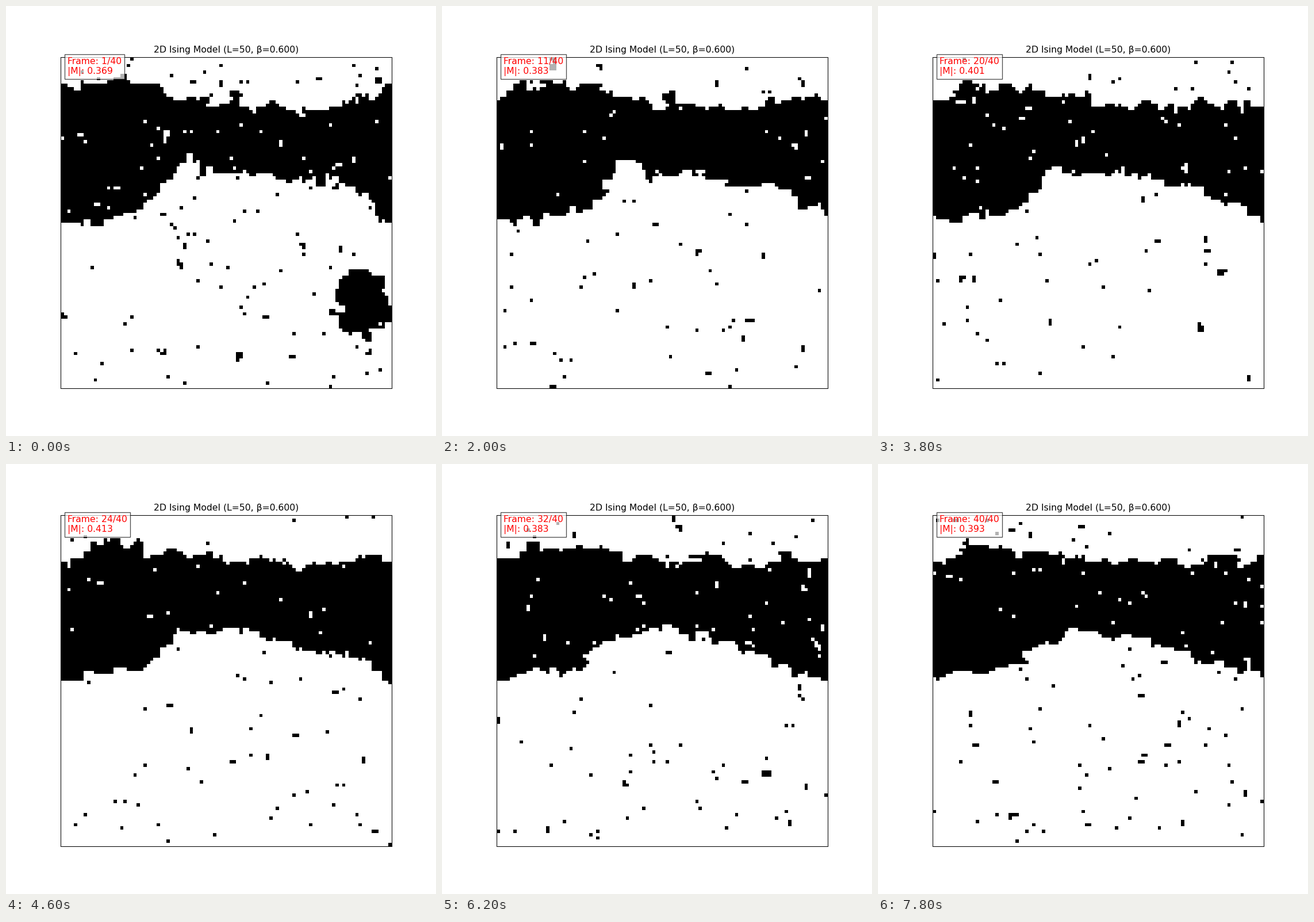
These frames come from a looping animation (748 px wide and 748 px high, 8000 ms). A matplotlib script:

```python
import numpy as np
import matplotlib.pyplot as plt
from matplotlib.animation import FuncAnimation

N = 100
FRAMES = 40
BETA = 0.6
SWEEPS = 3

# Band edges in rows at evenly spaced columns, at the start and end of the loop
TOP = ([11, 6.5, 7, 11.5, 14.5, 14, 17, 13, 10.5],
       [15, 8.5, 11, 12.5, 14, 12.5, 15.5, 12, 16])
BOTTOM = ([49, 51, 46, 31, 34, 35, 37, 38, 49],
          [50, 47, 45.5, 36.5, 35, 37, 41, 46, 49])

# Turning points of |M|: step -> value
MAG = {0: 0.369, 5: 0.376, 15: 0.390, 23: 0.413,
       27: 0.390, 34: 0.378, 39: 0.393}

rows, cols = np.indices((N, N))
x = np.arange(N)
parity = (rows + cols) % 2


def ripple(step, seed):
    """A few seeded waves drifting along an edge."""
    rng = np.random.default_rng(seed)
    waves = rng.integers(4, 10, 4)
    speed = rng.uniform(-0.25, 0.25, 4)
    phase = rng.uniform(0, 2 * np.pi, 4)
    angle = 2 * np.pi * np.outer(x / N, waves) + speed * step + phase
    return 0.5 * np.sin(angle).sum(axis=1)


def edge(ends, step, seed):
    first, last = map(np.array, ends)
    knots = first + (last - first) * step / (FRAMES - 1)
    curve = np.interp(x, np.linspace(0, N - 1, len(knots)), knots)
    return np.round(curve + ripple(step, seed))


def domains(step):
    """Dark band plus the droplet that dissolves early on."""
    dark = (rows >= edge(TOP, step, 1)) & (rows < edge(BOTTOM, step, 2))
    size = np.sqrt(max(0, 1 - step / 8.5))
    if size > 0:
        dx = (cols - 91 - 0.3 * step) / (9.3 * size)
        dy = (rows - 74 + 0.6 * step) / (10.5 * size)
        dark |= dx**2 + dy**2 < 1
    return np.where(dark, 1, -1)


def thermalize(spins, rng):
    """Checkerboard heat-bath sweeps on the periodic lattice."""
    for half in range(2 * SWEEPS):
        field = sum(np.roll(spins, d, axis) for d in (1, -1) for axis in (0, 1))
        p_up = 1 / (1 + np.exp(-2 * BETA * field))
        fresh = np.where(rng.random((N, N)) < p_up, 1, -1)
        spins = np.where(parity == half % 2, fresh, spins)
    return spins


def lattice(step):
    return thermalize(domains(step), np.random.default_rng(100 + step))


def label(step):
    mag = np.interp(step, list(MAG), list(MAG.values()))
    return f"Frame: {step + 1}/{FRAMES}\n|M|: {mag:.3f}"


fig, ax = plt.subplots(figsize=(8, 8), dpi=93.5)
fig.subplots_adjust(bottom=0.1107, top=0.8807)
image = ax.imshow(lattice(0), cmap="binary", vmin=-1, vmax=1,
                  interpolation="nearest")
ax.set_title(f"2D Ising Model (L=50, β={BETA:.3f})", fontsize=12)
ax.set_xticks([])
ax.set_yticks([])
info = ax.text(0.02, 0.95, label(0), transform=ax.transAxes, color="red",
               fontsize=12, bbox=dict(facecolor="white", alpha=0.7))


def update(step):
    image.set_data(lattice(step))
    info.set_text(label(step))
    return image, info


anim = FuncAnimation(fig, update, frames=FRAMES, interval=200,
                     repeat=True, repeat_delay=0)
plt.show()
```
